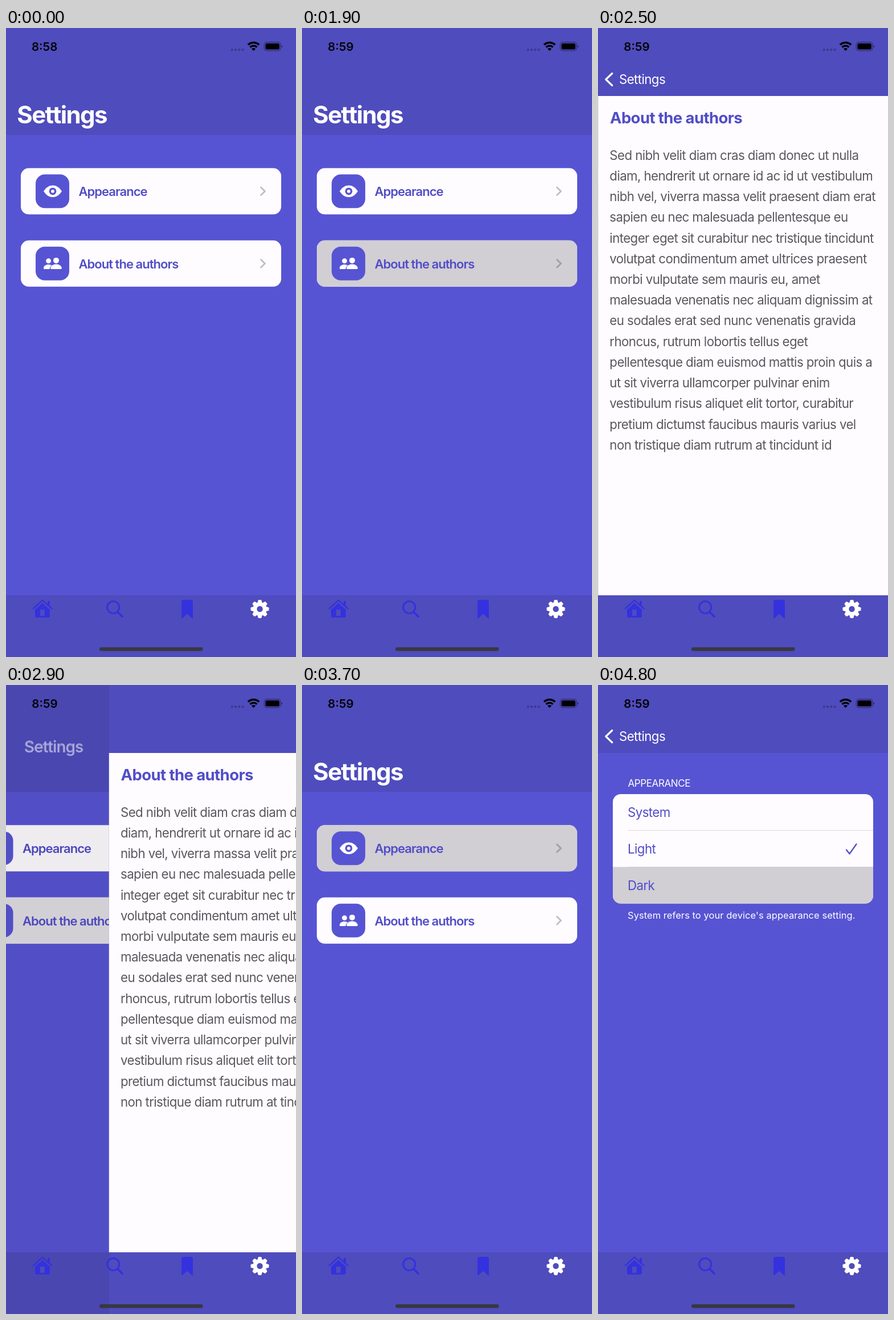
An HTML page for the animation above (5 s loop, 509 by 1101 pixels).

```html
<!DOCTYPE html>
<html lang="en">
<head>
<meta charset="utf-8">
<title>Settings</title>
<style>
  html, body { margin: 0; width: 100%; height: 100%; overflow: hidden; background: #5754d3; }
  svg { display: block; width: 100vw; height: 100vh; }
  text {
    font-family: Inter, Roboto, sans-serif;
    font-size: 22.3px;
    letter-spacing: -.6px;
    font-optical-sizing: none;
    white-space: pre;
  }
  .page { fill: #5754d3; }
  .bar { fill: #4f4cbd; }
  .paper { fill: #fefcff; }
  .pressed { fill: #d1ced4; }
  .ink { fill: #514dc8; }
  .white { fill: #fff; }
  .tab { fill: #3431de; }
  .tabLine { fill: none; stroke: #3431de; stroke-linecap: round; stroke-linejoin: round; }
  .label { font-size: 22px; font-weight: 600; letter-spacing: -.97px; }
  .heading { font-size: 27.5px; font-weight: 700; letter-spacing: -.6px; }
  .body { fill: #5a585d; }
  .title { font-size: 42px; font-weight: 700; letter-spacing: -1.6px; }
  .caps { font-size: 17px; letter-spacing: -.4px; }
  .note { font-size: 16.5px; letter-spacing: .05px; }
  .clock { font-size: 20.5px; font-weight: 600; letter-spacing: 0; text-anchor: middle; }
  .arrow { fill: none; stroke: rgba(60, 60, 67, .32); stroke-width: 2.8; stroke-linecap: round; stroke-linejoin: round; }
  .rule { stroke: #d9d7dc; stroke-width: 1; }
</style>
</head>
<body>
<svg viewBox="0 0 509 1101" preserveAspectRatio="none">
  <defs>
    <clipPath id="listClip"><rect x="26" y="191" width="457" height="191.5" rx="14"/></clipPath>
  </defs>

  <g id="home">
    <rect class="page" width="509" height="1101"/>
    <rect class="bar" width="509" height="187"/>
    <rect class="bar" y="993" width="509" height="108"/>
    <g id="cards"></g>
    <rect id="dim" width="509" height="1101" opacity="0"/>
  </g>

  <g id="about">
    <rect class="bar" width="509" height="1101"/>
    <rect class="paper" y="119" width="509" height="874"/>
    <text class="heading ink" x="20.8" y="167">About the authors</text>
    <g id="lines"></g>
  </g>

  <g id="looks">
    <rect class="page" width="509" height="1101"/>
    <rect class="bar" width="509" height="119"/>
    <rect class="bar" y="993" width="509" height="108"/>
    <text class="caps white" x="52.5" y="178">APPEARANCE</text>
    <g clip-path="url(#listClip)">
      <rect class="paper" x="26" y="191" width="457" height="192"/>
      <path class="rule" d="M53 254.5H483M53 318.5H483"/>
      <rect id="darkRow" class="pressed" x="26" y="318.5" width="457" height="64.5"/>
    </g>
    <text class="ink" x="52" y="231">System</text>
    <text class="ink" x="52" y="294.7">Light</text>
    <text class="ink" x="52" y="358.5">Dark</text>
    <path d="M436 288.5L441.5 295.5L453.5 278.5" fill="none" stroke="#514dc8" stroke-width="2.3" stroke-linecap="round" stroke-linejoin="round"/>
    <text class="note white" x="52" y="409">System refers to your device's appearance setting.</text>
  </g>

  <text id="large" class="title white">Settings</text>
  <text id="back" class="white">Settings</text>
  <path id="chevron" d="M24.8 79.5L13.8 90L24.8 100.5" fill="none" stroke="#fff" stroke-width="3.2" stroke-linecap="round" stroke-linejoin="round"/>

  <text id="clock" class="clock" y="40"></text>
  <g fill="#000" fill-opacity=".25">
    <circle cx="396.8" cy="38" r="2.1"/><circle cx="403" cy="38" r="2.1"/>
    <circle cx="409.2" cy="38" r="2.1"/><circle cx="415.4" cy="38" r="2.1"/>
  </g>
  <g fill="none" stroke="#000" stroke-width="3.4">
    <path d="M424.8 29.6A13.6 13.6 0 0 1 444.2 29.6"/>
    <path d="M428.5 33.6A8.4 8.4 0 0 1 440.5 33.6"/>
  </g>
  <path d="M434.5 40L431 36.5A5 5 0 0 1 438 36.5Z"/>
  <rect x="453.3" y="25" width="28.6" height="14.6" rx="4.3" fill="none" stroke="#000" stroke-opacity=".4" stroke-width="1.3"/>
  <rect x="455.4" y="27" width="24.5" height="10.6" rx="2.6"/>
  <path d="M483.4 29.8Q485.2 30.4 485.2 32.3T483.4 34.8Z" fill-opacity=".45"/>

  <path class="tabLine" stroke-width="2.4" d="M47.6 1016.3L64 1001.6L80.6 1016.3"/>
  <rect class="tab" x="73" y="1003" width="4" height="9"/>
  <path class="tab" d="M51 1018L64 1006.4L77 1018V1029Q77 1031.8 74.2 1031.8H53.8Q51 1031.8 51 1029Z"/>
  <rect class="bar" x="60" y="1018" width="7.8" height="11" rx="1"/>
  <circle class="tabLine" stroke-width="2.9" cx="188.2" cy="1014" r="10.6"/>
  <path class="tabLine" stroke-width="3.4" d="M196.2 1022.2L204.5 1030.5"/>
  <path class="tab" d="M308 1004.5Q308 1001 311.5 1001H324.5Q328 1001 328 1004.5V1032.5Q328 1034.5 326.2 1033L318 1025.5L309.8 1033Q308 1034.5 308 1032.5Z"/>
  <g id="gear" transform="translate(445.5 1017)"></g>

  <rect x="164" y="1084" width="181.5" height="6.5" rx="3.2" fill="#38383f"/>
</svg>

<script>
const $ = id => document.getElementById(id);
const set = (el, attrs) => { for (const k in attrs) el.setAttribute(k, attrs[k]); };

const icons = {
  eye: `<path class="white" d="M66 0C71 -7.3 76 -10.3 82 -10.3S93 -7.3 98 0C93 7.3 88 10.3 82 10.3S71 7.3 66 0Z"/>
    <circle class="page" r="6.4" cx="82"/><circle class="white" r="2.9" cx="82"/>`,
  people: `<g class="white"><circle cx="74.6" cy="-4.6" r="4.4"/><circle cx="88" cy="-5.4" r="5"/>
    <path d="M66 8.3C66 4 70 1.7 74.6 1.7Q78 1.7 80.4 3.2Q77 5.5 76.6 9.8H67.4Q66 9.8 66 8.3Z"/>
    <path d="M78.2 8C78.6 3.6 83 1.2 88 1.2S97.4 3.6 97.8 8Q97.8 9.8 96.2 9.8H79.8Q78.2 9.8 78.2 8Z"/></g>`
};
const card = (y, label, icon, id) => `<g transform="translate(0 ${y})">
  <rect class="paper" x="26" y="-40.5" width="457" height="81" rx="14"/>
  <rect id="${id}" class="pressed" x="26" y="-40.5" width="457" height="81" rx="14"/>
  <rect class="page" x="52" y="-29.5" width="59" height="59" rx="16"/>${icons[icon]}
  <text class="label ink" x="127.5" y="8.3">${label}</text>
  <path class="arrow" d="M447.5 -6.8L454.5 0L447.5 6.8"/></g>`;
$('cards').innerHTML = card(285.8, 'Appearance', 'eye', 'looksRow') +
  card(412.3, 'About the authors', 'people', 'aboutRow');

$('lines').innerHTML = `Sed nibh velit diam cras diam donec ut nulla
diam, hendrerit ut ornare id ac id ut vestibulum
nibh vel, viverra massa velit praesent diam erat
sapien eu nec malesuada pellentesque eu
integer eget sit curabitur nec tristique tincidunt
volutpat condimentum amet ultrices praesent
morbi vulputate sem mauris eu, amet
malesuada venenatis nec aliquam dignissim at
eu sodales erat sed nunc venenatis gravida
rhoncus, rutrum lobortis tellus eget
pellentesque diam euismod mattis proin quis a
ut sit viverra ullamcorper pulvinar enim
vestibulum risus aliquet elit tortor, curabitur
pretium dictumst faucibus mauris varius vel
non tristique diam rutrum at tincidunt id`.split('\n')
  .map((s, i) => `<text class="body" x="20.2" y="${230.6 + i * 36.23}">${s}</text>`).join('');

let teeth = '';
for (let a = 0; a < 360; a += 45)
  teeth += `<path d="M-4.4 -10L-3 -15Q-2.7 -16 -1.8 -16H1.8Q2.7 -16 3 -15L4.4 -10Z" transform="rotate(${a})"/>`;
$('gear').innerHTML = `<g class="white"><circle r="11.8"/>${teeth}</g><circle class="bar" r="5.2"/>`;

const W = 509, LOOP = 5000, STEP = 100;
const PUSH_ABOUT = 1933, POP = 2833, PUSH_LOOKS = 3717;
const mix = (a, b, k) => a + (b - a) * k;

// Critically damped spring: share of the way still to go.
function left(t, start) {
  const w = Math.max(0, t - start) * 0.01865;
  return (1 + w) * Math.exp(-w);
}

function draw(t) {
  const popping = t >= POP && t < PUSH_LOOKS;
  const p = popping ? left(t, POP) : 1 - left(t, t < POP ? PUSH_ABOUT : PUSH_LOOKS);
  const onLooks = t >= 3700;
  const shift = `translate(${W * (1 - p)} 0)`;

  set($('home'), { transform: `translate(${-0.3 * W * p} 0)` });
  set($('dim'), { opacity: 0.1 * p });
  set($('about'), { transform: shift, visibility: onLooks ? 'hidden' : 'visible' });
  set($('looks'), { transform: shift, visibility: onLooks ? 'visible' : 'hidden' });
  set($('aboutRow'), { opacity: t < 1900 || onLooks ? 0 : popping ? p : 1 });
  set($('looksRow'), { opacity: onLooks ? 1 : 0 });
  set($('darkRow'), { opacity: t >= 4800 ? 1 : 0 });

  // The large title shrinks into the back button.
  const q = popping ? p + 0.28 * p * (1 - p) : p;
  const press = t >= 2800 && t < POP ? 0.4 : 1;
  const width = mix(159, 82, q), y = mix(167, 98, q);
  set($('large'), { transform: `translate(${mix(19.3, 37, q)} ${y}) scale(${width / 159})`, opacity: 1 - q });
  set($('back'), { transform: `translate(${mix(20, 37, q)} ${y}) scale(${width / 82})`, opacity: press * (popping ? q ** 3 : p) });
  set($('chevron'), {
    transform: `translate(${73 * (1 - p)} ${45 * (1 - p)})`,
    opacity: press * Math.max(0, 1 - (1 - p) / 0.12)
  });

  $('clock').textContent = t < 100 ? '8:58' : '8:59';
  set($('clock'), { x: t < 100 ? 67.6 : 68 });
}

const begin = performance.now();
function tick() {
  const t = (performance.now() - begin) % LOOP;
  draw(Math.floor(t / STEP) * STEP);
  requestAnimationFrame(tick);
}
tick();
</script>
</body>
</html>
```
